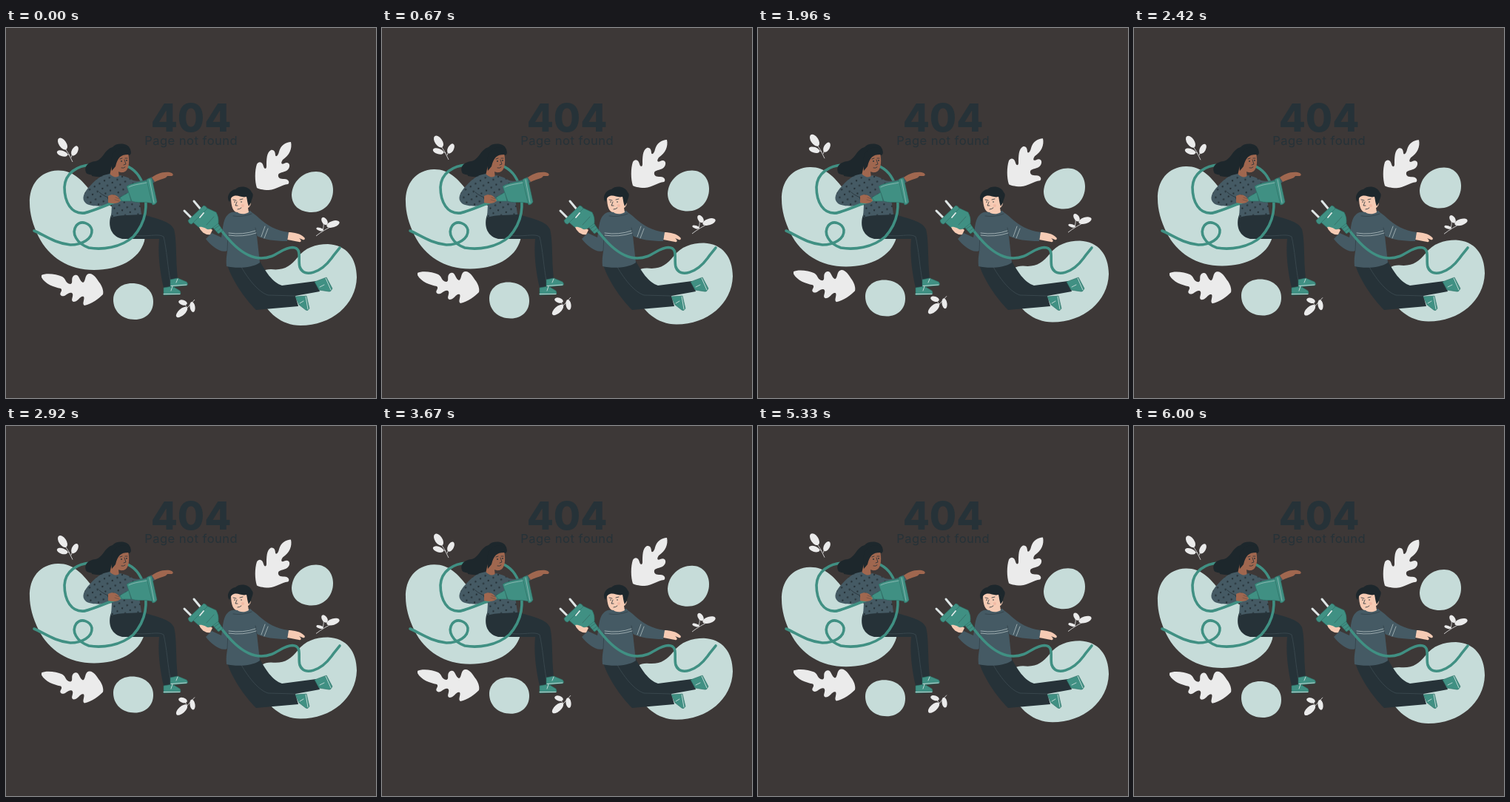
Animation of 500x500 px, one loop 6040 ms. Source, as an HTML page:

```html
<!DOCTYPE html>
<html lang="en">
<head>
<meta charset="utf-8">
<title>Page not found</title>
<style>
  html, body { margin: 0; width: 100%; height: 100%; overflow: hidden; background: #3d3837; }
  svg { display: block; width: 100vw; height: 100vh; }
  text { font-family: Inter, "Open Sans", sans-serif; fill: #263238; text-anchor: middle; }
  .blob { fill: #c6dcd9; }
  .leaf { fill: #ebebeb; }
  .stem { fill: none; stroke: #ebebeb; stroke-width: .8; }
  .dark { fill: #263238; }
  .hair { fill: #1d272c; }
  .wool { fill: #455a64; }
  .teal { fill: #409083; }
  .edge { stroke: #2c6d64; stroke-width: .6; stroke-linejoin: round; }
  .cable { fill: none; stroke: #409083; stroke-width: 3.6; stroke-linecap: round; }
  .brown { fill: #a0674f; }
  .pale { fill: #f6cbb4; }
  .line { fill: none; stroke: #263238; stroke-width: .8; stroke-linecap: round; }
  .seam { fill: none; stroke: #46545b; stroke-width: .6; }
  .light { fill: none; stroke: #dfe9e8; stroke-width: .8; stroke-linecap: round; }
</style>
</head>
<body>
<svg viewBox="0 0 500 500">
  <defs>
    <pattern id="dots" width="11" height="11" patternUnits="userSpaceOnUse" patternTransform="rotate(14)">
      <rect width="11" height="11" fill="#455a64"/>
      <circle cx="3" cy="3" r="1.15" fill="#222d33"/>
      <circle cx="8.5" cy="8.5" r="1.15" fill="#222d33"/>
    </pattern>
  </defs>

  <text x="250" y="140" font-size="52.5" font-weight="800">404</text>
  <text x="250.2" y="158" font-size="16.5" letter-spacing=".5">Page not found</text>

  <g id="blobs" class="blob">
    <path d="M32 237C31 212 46 193 70 192.500C90 192 102 205 114 220C128 237 150 243 168 256C180 265 190 278 187 288C180 313 152 327 119 327C85 327 58 310 44 282C36 266 32 250 32 237Z"/>
    <path d="M435 292C460 293 474 311 474 337C473 374 440 402 398 402C372 402 352 384 343 362C336 345 338 326 358 326C376 328 384 322 394 310C404 297 418 292 435 292Z"/>
    <path d="M386 225C387 207 402 194 419 194C433 194 442 205 442 219C442 236 430 249 413 249C397 249 386 240 386 225Z"/>
    <path d="M145 367C145 354 156 345 170 345C187 345 199 355 199 370C199 384 189 394 174 394C157 394 145 383 145 367Z"/>
  </g>

  <g id="leaves">
    <g class="leaf">
      <path d="M385 154C387 163 383 172 374 178C371 182 372 185 376 183C382 180 385 185 382 190C378 196 370 194 368 198C367 203 371 204 376 204C382 204 384 209 381 211C372 212 366 218 355 219C346 219 341 217 339 216C336 207 336 193 339 184C342 179 347 181 348 187C349 191 352 191 352 187C352 178 352 168 358 165C363 164 364 169 364 172C365 175 368 172 369 167C371 159 378 154 385 154Z"/>
      <path d="M48 334C53 331 68 332 76 336C82 340 80 345 87 346C92 345 86 337 93 334C99 332 99 342 104 344C108 343 106 333 112 332C118 331 122 338 127 345C131 351 132 357 131 360C126 365 116 373 106 375C102 373 107 366 105 363C100 361 98 370 91 370C86 368 93 361 89 358C84 356 80 364 75 362C70 359 78 355 74 352C64 350 53 346 48 337Z"/>
    </g>
  </g>

  <!-- woman -->
  <path class="cable" d="M106 250C88 252 79 235 79 215C80 196 96 186 115 185C150 177 178 184 186 215"/>
  <path class="hair" d="M144 161C149 155 163 155 167 162C170 167 169 172 166 172L156 176L148 195C142 201 130 203 116 200C117 197 109 199 108 195C105 187 111 181 121 180C131 178 133 164 144 161Z"/>
  <path class="wool" d="M166 204C178 209 188 207 197 201L201 208C192 215 180 219 168 217Z"/>
  <path class="brown" d="M197 202C203 198 210 194 221 195C226 196 227 199 224 200L218 200C216 204 208 204 201 208Z"/>
  <path class="brown" d="M145 178C149 169 159 166 165 169C167 178 167 190 161 194C157 196 154 195 152 194L153 203C148 206 143 203 140 199Z"/>
  <path class="hair" d="M142 182C142 166 152 158 166 163C170 168 168 173 165 171C155 171 151 175 148 187L143 193Z"/>
  <path class="line" d="M154 177l3-1M161 176l3 0M160 178l2 6l-3 1M156 189q3 1 5-1"/>
  <circle class="dark" cx="156" cy="180" r=".9"/>
  <circle class="dark" cx="163" cy="179" r=".9"/>
  <path class="dark" d="M143 250C137 264 140 281 157 285L207 285C205 305 208 330 213 351L226 350L224 340L232 339C229 310 231 287 227 272C222 261 205 258 181 251Z"/>
  <path class="seam" d="M172 280C190 283 206 277 213 282C217 298 219 326 222 341"/>
  <path class="teal edge" d="M213 351L225 349L235 355Q237 359 235 360L213 361Z"/>
  <path class="teal edge" d="M222 340L232 338L244 343Q247 347 244 348L222 350Z"/>
  <path class="light" d="M213 359.500H235M223 348.500L244 347M225 349l-2 6M232 339l-2 5"/>
  <path fill="url(#dots)" d="M140 197C145 202 150 203 154 199C168 202 177 207 178 217L183 252C170 253 155 252 142 256L143 239C133 241 115 242 108 237C101 231 105 222 114 213C122 204 128 199 140 197Z"/>
  <path class="line" d="M126 222C130 226 138 229 142 231M143 239L146 232"/>
  <path class="cable" d="M186 215C192 240 190 262 172 282C155 297 130 300 112 297C95 291 88 277 95 267C102 259 114 264 116 273C117 285 103 293 87 293C66 291 52 280 38 274"/>
  <path class="cable" d="M106 250C119 247 141 237 158 231"/>
  <path class="teal edge" d="M154 229L166 222L169 234L157 234Z"/>
  <path class="teal edge" d="M163 214C171 209 182 208 191 206L198 237C188 234 178 237 170 234Z"/>
  <path class="teal edge" d="M190 205Q193 202 197 203L204 235Q202 239 198 239Z"/>
  <path class="light" opacity=".55" d="M166 215C174 211 182 211 190 209M194 205L200 236"/>
  <path class="brown" d="M138 227C143 224 149 225 152 229L155 233C153 237 146 238 138 236Z"/>
  <path class="line" stroke-opacity=".4" d="M148 229l5 2M147 232l6 2"/>

  <!-- man -->
  <path class="dark" d="M299 320L343 315C350 328 360 344 373 348L419 342L424 356L391 362L395 376L338 381C322 365 305 340 299 320Z"/>
  <path class="seam" d="M318 323C329 342 342 357 354 361L391 362"/>
  <path class="teal edge" d="M417 343L433 337L441 352Q439 357 436 356L423 354Z"/>
  <path class="teal edge" d="M391 363L406 362L410 379Q408 383 405 381L396 374Z"/>
  <path class="light" d="M432 338L439 354M405 363L408 380M424 350l6-3M397 372l5-3"/>
  <path class="pale" d="M381 276C390 276 398 278 403 283C405 285 403 287 401 286L396 284C400 287 399 290 396 289C390 288 386 287 380 286Z"/>
  <path class="wool" d="M305 249L330 247C333 250 337 252 342 257C352 266 365 274 382 276L380 288C362 288 350 286 339 281L343 317C332 325 310 325 298 322C297 310 299 305 299 301C290 305 277 294 270 285L278 277L291 283C294 270 292 254 305 249Z"/>
  <path class="line" stroke-opacity=".6" d="M307 254Q320 256 332 251M299 301L300 279M339 281L337 270"/>
  <path class="light" opacity=".7" d="M301 277Q320 280 337 274M301 280Q320 283 338 277M345 282L350 268M349 284L354 271"/>
  <path class="pale" d="M304 228C311 222 325 223 330 231C332 237 330 242 327 243L328 249C322 253 314 251 313 249C307 249 304 242 304 228Z"/>
  <path class="hair" d="M302 235C297 229 302 219 310 218C316 212 329 214 332 222C336 226 332 230 331 236L328 241C326 236 326 232 325 228C317 230 313 224 306 228C303 230 303 233 302 235Z"/>
  <path class="line" d="M307 232l4 1M316 232l4-1M312 235l-2 5l3 0M313 245q3 0 5-2"/>
  <circle class="dark" cx="309" cy="235" r=".8"/>
  <circle class="dark" cx="318" cy="235" r=".8"/>
  <circle cx="320" cy="240" r="2" fill="#eeaa96" opacity=".5"/>
  <path class="cable" d="M286 267C298 283 319 311 345 311C365 311 372 297 387 296.500C401 297 394 312 397 323C403 339 426 330 440 311C444 305 448 301 451 297"/>
  <path class="pale" d="M260 267C264 265 273 268 279 273L276 279C272 280 267 278 264 274Z"/>
  <path d="M254 234L264 246M241 247L252 258" fill="none" stroke="#dfe6e6" stroke-width="3" stroke-linecap="round"/>
  <path class="teal edge" d="M278 268L286 263L293 274L287 278Z"/>
  <path class="teal edge" d="M251 261L271 243L284 249Q288 256 287 264L278 271Q266 274 260 269Z"/>
  <path class="teal edge" d="M246 260L267 240Q270 240 272 244L251 265Q247 265 246 260Z"/>
  <path d="M262 256L267 250" stroke="#e3ecea" stroke-width="1.800" stroke-linecap="round"/>
  <path class="line" stroke-opacity=".4" d="M271 266L281 255M282 271l6-4M285 275l5-4"/>
  <path class="pale" d="M261 269C265 268 271 271 275 274Q276 277 272 276L263 273Z"/>
</svg>
<script>
  const LOOP = 6040, STEPS = 145, RISE = 6.8;
  const blobs = document.getElementById("blobs");
  const leaves = document.getElementById("leaves");

  // Sprigs: a stem path, then leaflets as [x, y, long radius, short radius, angle]
  const sprigs = [
    ["M78 160Q85 169 90 181M69 168Q80 168 86 172M95 161Q89 169 88 175",
      [76.5, 156.5, 9, 5, 56], [93, 166, 7.2, 4, -62], [76, 169.5, 7.5, 3.8, 18]],
    ["M419 281Q429 273 446 265M429 260Q430 267 428 274",
      [442, 265, 9, 4.3, -17], [430.5, 261, 5.8, 3.5, 57], [424, 272, 4.8, 2, 17]],
    ["M232 389Q244 381 255 367M237 370Q243 374 245 378",
      [237.5, 384, 9.5, 4.5, -42], [239, 371, 6, 3.4, 18], [252, 377, 7, 3.5, 81]]
  ];

  function add(tag, attrs) {
    const el = document.createElementNS("http://www.w3.org/2000/svg", tag);
    for (const key in attrs) el.setAttribute(key, attrs[key]);
    leaves.append(el);
  }

  for (const [d, ...parts] of sprigs) {
    add("path", { class: "stem", d });
    for (const [cx, cy, rx, ry, angle] of parts)
      add("ellipse", { class: "leaf", cx, cy, rx, ry, transform: `rotate(${angle} ${cx} ${cy})` });
  }

  // Linear rise and fall, 0 to 1 and back
  const swing = p => 1 - Math.abs(1 - 2 * (p % 1));
  const lift = (el, p) => el.setAttribute("transform", `translate(0 ${-RISE * swing(p)})`);

  function draw() {
    const p = Math.floor((performance.now() % LOOP) / LOOP * STEPS) / STEPS;
    lift(blobs, p);
    lift(leaves, p * 2);
    requestAnimationFrame(draw);
  }
  draw();
</script>
</body>
</html>
```
